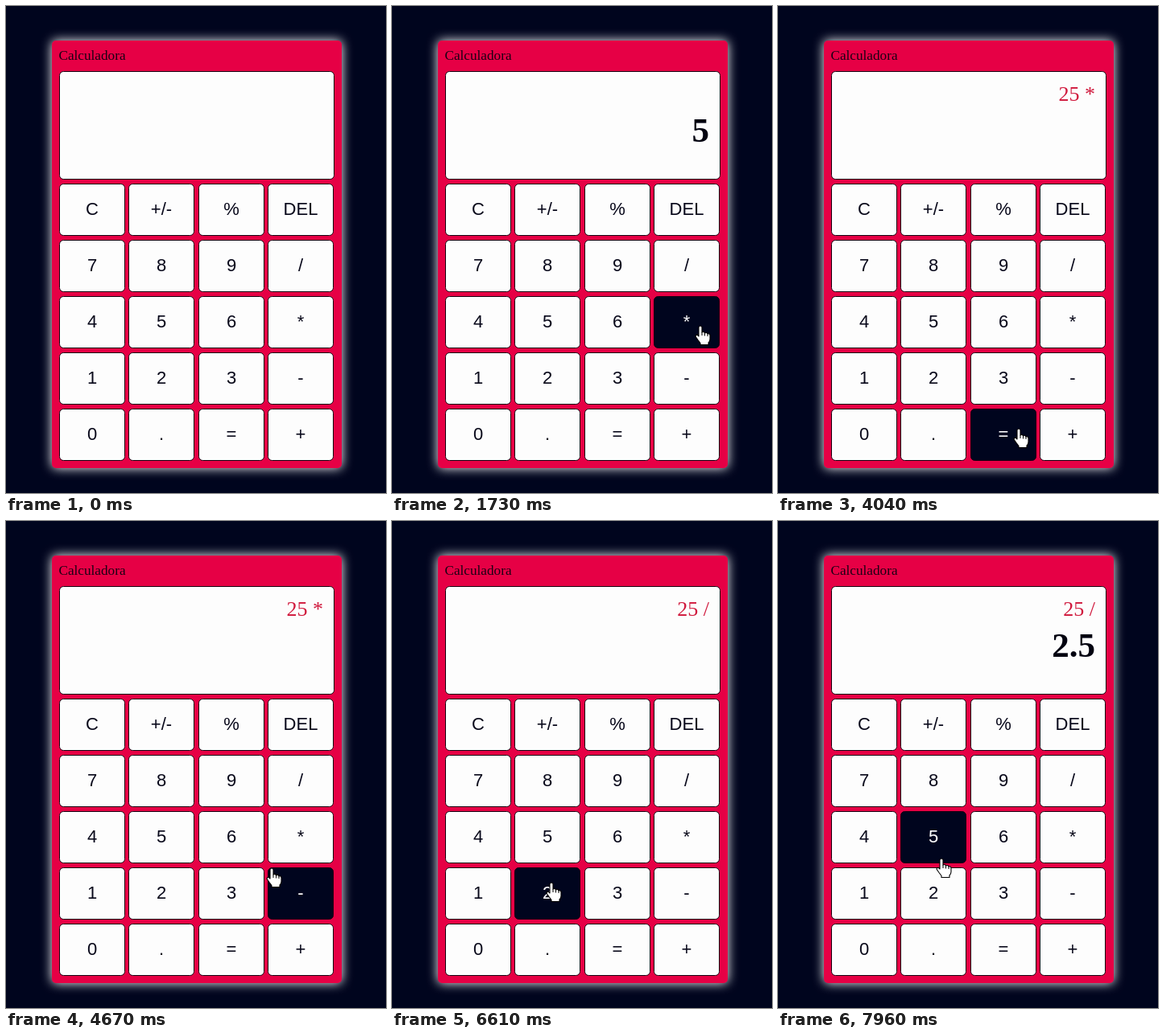
Recreate the animation shown at these times as an HTML page. Size 472 by 606 pixels, loop 8 s.

```html
<!DOCTYPE html>
<html lang="es">
<head>
<meta charset="utf-8">
<title>Calculadora</title>
<style>
  html, body { margin: 0; width: 100%; height: 100%; overflow: hidden; background: #00051e; }
  #stage { position: relative; width: 472px; height: 606px; overflow: hidden; }
  .card {
    position: absolute; left: 57px; top: 43px; width: 360px; height: 532px;
    border-radius: 5px; background: #e60045; box-shadow: 0 0 14px #fff;
  }
  svg { position: absolute; left: 0; top: 0; }
  text { white-space: pre; }
  .serif { font-family: "Liberation Serif", "Times New Roman", serif; }
  .box { fill: #fdfdfd; stroke: #14000f; }
  .key text { font: 22px "Liberation Sans", Arial, sans-serif; text-anchor: middle; fill: #08081a; }
  .key.hover .box { fill: #00051e; }
  .key.hover text { fill: #fff; }
  .cursor path { fill: #fff; stroke: #000; stroke-width: 1.1; stroke-linejoin: round; }
  .cursor .crease { fill: none; stroke-width: 1; }
</style>
</head>
<body>
<div id="stage">
  <div class="card"></div>
  <svg width="472" height="606" viewBox="0 0 472 606">
    <text class="serif" x="65.5" y="67" font-size="17.2" fill="#1c0014">Calculadora</text>
    <rect class="box" x="66.5" y="81.5" width="341" height="134" rx="5"/>
    <text class="serif" id="upper" x="394" y="118" font-size="26" text-anchor="end" fill="#d0183c"></text>
    <text class="serif" id="lower" x="394" y="168.5" font-size="43" font-weight="bold" text-anchor="end" fill="#020210"></text>
    <g id="keys"></g>
    <g class="cursor" id="cursor">
      <g id="hand">
        <path d="M-2 1.5Q0-1.5 2 1.5V8Q4.5 6.5 5.5 9Q8 7.5 9 10Q11.5 9 12 12V16.5Q12 19 10 21V23.5H0V21.5L-3 17.5L-5.8 13.5Q-6 10.8-3.5 11.6L-2 13Z"/>
        <path class="crease" d="M2 8V12M5.5 9V12.5M9 10V13"/>
      </g>
      <path id="arrow" d="M0 0V17L4 13.2L6.8 19.5L9.4 18.3L6.6 12.2H12Z"/>
    </g>
  </svg>
</div>
<script>
const LOOP = 8000, PRESS_DELAY = 140;
const KEY_W = 82, KEY_H = 65, HOTSPOT = 5;
const LABELS = 'C +/- % DEL 7 8 9 / 4 5 6 * 1 2 3 - 0 . = +'.split(' ');
const OPERATE = {
  '+': (a, b) => a + b, '-': (a, b) => a - b, '*': (a, b) => a * b, '/': (a, b) => a / b
};

const byId = id => document.getElementById(id);
const [upper, lower, cursor, hand, arrow] =
  ['upper', 'lower', 'cursor', 'hand', 'arrow'].map(byId);

function svgNode(parent, tag, attrs) {
  const node = document.createElementNS('http://www.w3.org/2000/svg', tag);
  for (const name in attrs) node.setAttribute(name, attrs[name]);
  return parent.appendChild(node);
}

const keys = LABELS.map((label, i) => {
  const x = 66 + Math.floor((i % 4) * 86.5);
  const y = 221 + Math.floor(i / 4) * 70;
  const node = svgNode(byId('keys'), 'g', { class: 'key' });
  svgNode(node, 'rect', { class: 'box', x: x + .5, y: y + .5, width: KEY_W - 1, height: KEY_H - 1, rx: 5 });
  svgNode(node, 'text', { x: x + KEY_W / 2, y: y + 39 }).textContent = label;
  return { node, label, x, y };
});

// The pointer rests on a key from arrive to leave, off its centre by dx, dy.
function visit(label, arrive, leave, dx, dy) {
  const key = keys.find(k => k.label === label);
  return { label, arrive, leave, x: key.x + KEY_W / 2 + dx, y: key.y + KEY_H / 2 + dy };
}

const entry = { arrive: 130, leave: 130, x: -16, y: 470 };
const visits = [
  visit('5', 800, 1000, 14, -6),
  visit('*', 1600, 1830, 17, 4),
  visit('5', 2460, 2700, 14, 12),
  visit('=', 3250, 4040, 19, -7),
  visit('/', 5250, 5960, -9, 26),
  visit('2', 6600, 6900, 5, -14),
  visit('.', 7400, 7690, 7, -6),
  visit('5', 7790, LOOP, 10, 26.5)
];
const stops = [entry, ...visits];

function readoutAt(t) {
  let total = '', operator = '', typed = '';
  for (const { label, arrive } of visits) {
    if (t < arrive + PRESS_DELAY) break;
    if (label !== '=' && !OPERATE[label]) { typed += label; continue; }
    if (typed) total = operator ? OPERATE[operator](+total, +typed) : typed;
    if (label !== '=') operator = label;
    typed = '';
  }
  return [operator && `${total} ${operator}`, typed];
}

function pointerAt(t) {
  const i = stops.findLastIndex(stop => stop.arrive <= t);
  if (i < 0) return { x: -50, y: -50 };
  const from = stops[i], to = stops[i + 1];
  if (!to || t <= from.leave) return from;
  const p = (t - from.leave) / (to.arrive - from.leave);
  const ease = p * p * (3 - 2 * p);
  return { x: from.x + (to.x - from.x) * ease, y: from.y + (to.y - from.y) * ease };
}

function draw(t) {
  [upper.textContent, lower.textContent] = readoutAt(t);

  const { x, y } = pointerAt(t);
  const hotY = y + HOTSPOT;
  for (const key of keys) {
    const over = x >= key.x && x < key.x + KEY_W && hotY >= key.y && hotY < key.y + KEY_H;
    key.node.classList.toggle('hover', over);
  }
  const onPad = x >= 66 && x < 408 && hotY >= 221 && hotY < 566;
  hand.style.display = onPad ? '' : 'none';
  arrow.style.display = onPad ? 'none' : '';
  cursor.setAttribute('transform', `translate(${Math.round(x)} ${Math.round(y)})`);
}

function tick() {
  draw(performance.now() % LOOP);
  requestAnimationFrame(tick);
}
tick();
</script>
</body>
</html>
```
